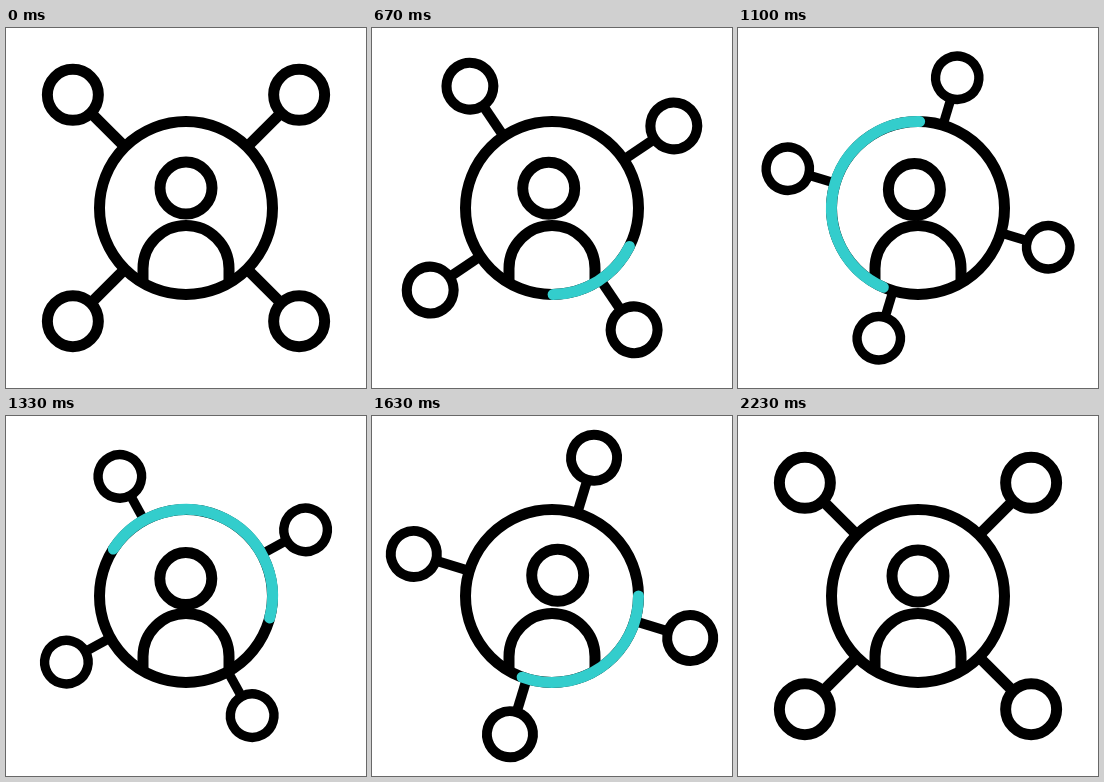
Animation of 360x360 px, one loop 2500 ms. Source, as an HTML page:

```html
<!DOCTYPE html>
<html lang="en">
<head>
<meta charset="utf-8">
<title>Network</title>
<style>
  html, body { margin: 0; width: 100%; height: 100%; overflow: hidden; background: #fff; }
  svg { display: block; width: 100%; height: 100%; fill: none; stroke: #000; stroke-width: 11; }
</style>
</head>
<body>
<svg viewBox="0 0 360 360">
  <g id="hub"></g>
  <circle cx="180" cy="180" r="86.5" fill="#fff"/>
  <path d="M137 255V240.5A43 43 0 0 1 223 240.5V255"/>
  <circle id="head" cx="180" cy="160" r="26"/>
  <path id="sweep" stroke-linecap="round"/>
</svg>
<script>
const LOOP = 2500, FPS = 30, STEPS = 75;
const START = 8, END = 67;
const TEAL = '#33cdcc', PALE = '#c8c8c8';
const $ = id => document.getElementById(id);
const hub = $('hub'), head = $('head'), sweep = $('sweep');

hub.innerHTML = [45, 135, 225, 315].map(a =>
  `<g transform="rotate(${a})"><path d="M86 0H136"/><circle cx="160" r="25.5"/></g>`).join('');

// Symmetric ease-in-out: cubic-bezier(.53, 0, .47, 1)
function ease(p) {
  if (p <= 0) return 0;
  if (p >= 1) return 1;
  let lo = 0, hi = 1, t = .5;
  for (let i = 0; i < 30; i++) {
    t = (lo + hi) / 2;
    const u = 1 - t;
    const x = 1.59 * t * u * u + 1.41 * t * t * u + t * t * t;
    if (x < p) lo = t; else hi = t;
  }
  return t * t * (3 - 2 * t);
}
const span = (n, a, b) => ease((n - a) / (b - a));

// Smooth curve through [step, value] keys, without overshoot
function curve(keys) {
  const grade = i => (keys[i + 1][1] - keys[i][1]) / (keys[i + 1][0] - keys[i][0]);
  const slope = keys.map((_, i) => {
    if (i === 0 || i === keys.length - 1) return 0;
    const a = grade(i - 1), b = grade(i);
    return a * b > 0 ? 2 * a * b / (a + b) : 0;
  });
  return n => {
    if (n <= keys[0][0]) return keys[0][1];
    const i = keys.findIndex(k => k[0] >= n) - 1;
    if (i < 0) return keys[keys.length - 1][1];
    const [x0, y0] = keys[i], [x1, y1] = keys[i + 1];
    const w = x1 - x0, t = (n - x0) / w, s = t * t * (3 - 2 * t), u = 1 - t;
    return y0 + (y1 - y0) * s + w * t * u * (slope[i] * u - slope[i + 1] * t);
  };
}

// Sweep ends, in degrees relative to the turning hub
const tail = curve([[13, 13], [14, 13.1], [26, 20.7], [40, 106.8], [49, 208], [55, 279.7], [60, 320]]);
const lead = curve([[13, 13], [14, 20], [26, 140.5], [40, 268.7], [49, 318.3], [55, 320]]);
const headX = curve([[12, 0], [26, -5.4], [40, -.2], [49, 5.7], [55, 1], [60, 0]]);
const headY = curve([[12, 0], [26, .4], [40, 2.4], [49, -.7], [55, 0]]);

function point(deg) {
  const a = deg * Math.PI / 180;
  return `${180 + 86.5 * Math.cos(a)} ${180 + 86.5 * Math.sin(a)}`;
}

function draw(n) {
  const turn = 180 * span(n, START, END);
  const scale = 1 - .15 * (span(n, START, 31) - span(n, 35.5, END));
  hub.setAttribute('transform', `translate(180 180) rotate(${turn}) scale(${scale})`);
  head.setAttribute('transform', `translate(${headX(n)} ${headY(n)})`);

  const a = tail(n), b = lead(n), shown = b - a > .1;
  sweep.setAttribute('visibility', shown ? 'visible' : 'hidden');
  if (!shown) return;
  sweep.setAttribute('stroke', n < 16 ? PALE : TEAL);
  sweep.setAttribute('d',
    `M${point(a + turn)}A86.5 86.5 0 ${b - a > 180 ? 1 : 0} 1 ${point(b + turn)}`);
}

let origin;
function tick(now) {
  origin ??= now;
  const t = (now - origin) % LOOP;
  // The small lead keeps steps aligned with times rounded to 10 ms
  draw(Math.floor(t * FPS / 1000 + .15) % STEPS);
  requestAnimationFrame(tick);
}
draw(0);
requestAnimationFrame(tick);
</script>
</body>
</html>
```
